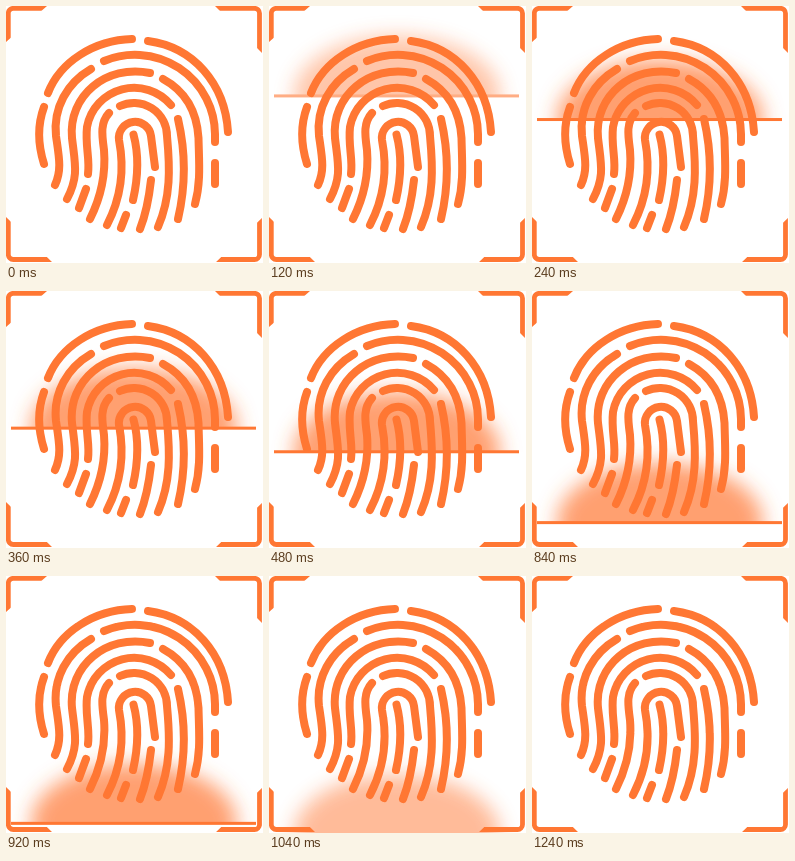
These frames come from a looping animation (257x257 px, 1.96 s). An HTML page:

```html
<!DOCTYPE html>
<html lang="en">
<head>
<meta charset="utf-8">
<title>Fingerprint scan</title>
<style>
  html, body { margin: 0; width: 100%; height: 100%; overflow: hidden; background: #fff; }
  svg { display: block; width: 100%; height: 100%; }
</style>
</head>
<body>
<svg viewBox="0 0 257 257">
  <defs>
    <filter id="soft" x="-30%" y="-60%" width="160%" height="220%">
      <feGaussianBlur stdDeviation="10"/>
    </filter>
    <clipPath id="above"><rect x="0" y="-120" width="257" height="120"/></clipPath>
    <clipPath id="corners">
      <path d="M0 0H41L0 36ZM209 0H257V48ZM0 211L47 257H0ZM257 211V257H209Z"/>
    </clipPath>
  </defs>

  <g id="scan" fill="#ff7733">
    <ellipse cx="128" cy="0" rx="103" ry="60" fill-opacity=".7" filter="url(#soft)" id="glow"
      style="display:none"/>
    <g clip-path="url(#above)">
      <ellipse cx="128" cy="0" rx="103" ry="60" fill-opacity=".7" filter="url(#soft)"/>
    </g>
    <rect x="5" y="-1.5" width="245" height="3"/>
  </g>

  <g fill="none" stroke="#ff7733">
    <rect x="2.3" y="2.3" width="251.2" height="251.2" rx="5" stroke-width="4.8" clip-path="url(#corners)"/>
    <g stroke-width="8" stroke-linecap="round">
      <path d="M42 87C54 56 88 34 126 33M38 101C31 120 32 139 38 158M142 35C187 41 219 77 222 126"/>
      <path d="M85 63C61 77 47 102 50 130C53 151 56 164 49 179M98 55A80 80 0 0 1 209 128V136M209 157V178"/>
      <path d="M144 67C100 58 62 90 66 132C69 158 73 170 61 193M157 73C181 86 191 107 192.5 132C193 156 195 176 189 198"/>
      <path d="M82 168C84 152 79 140 81 121A48 48 0 0 1 165 99M80 183L73 202M172 113C179 143 180 179 172 213"/>
      <path d="M103 107C94 117 96 129 98 144C100 169 95 191 84 213M114 100A33 33 0 0 1 161 130C164 162 165 191 152 221"/>
      <path d="M101 219C114 194 119 165 113 134A16 16 0 0 1 145 130L149 161M145 174C143 192 140 208 134 223"/>
      <path d="M127.5 128.5C133 149 132 172 127 194M120 209L115 222"/>
    </g>
  </g>
</svg>
<script>
  const LOOP = 1960, STEP = 40;
  const scan = document.getElementById('scan');
  const clamp = v => Math.max(0, Math.min(1, v));
  const start = performance.now();

  function draw(now) {
    const t = Math.floor(Math.max(0, now - start) % LOOP / STEP) * STEP;
    const y = Math.min(66.3 + t * 0.1968, 258.5);
    scan.setAttribute('transform', `translate(0 ${y})`);
    scan.setAttribute('opacity', clamp(t / 200) * clamp((1240 - t) / 280));
    requestAnimationFrame(draw);
  }
  draw(start);
</script>
</body>
</html>
```
